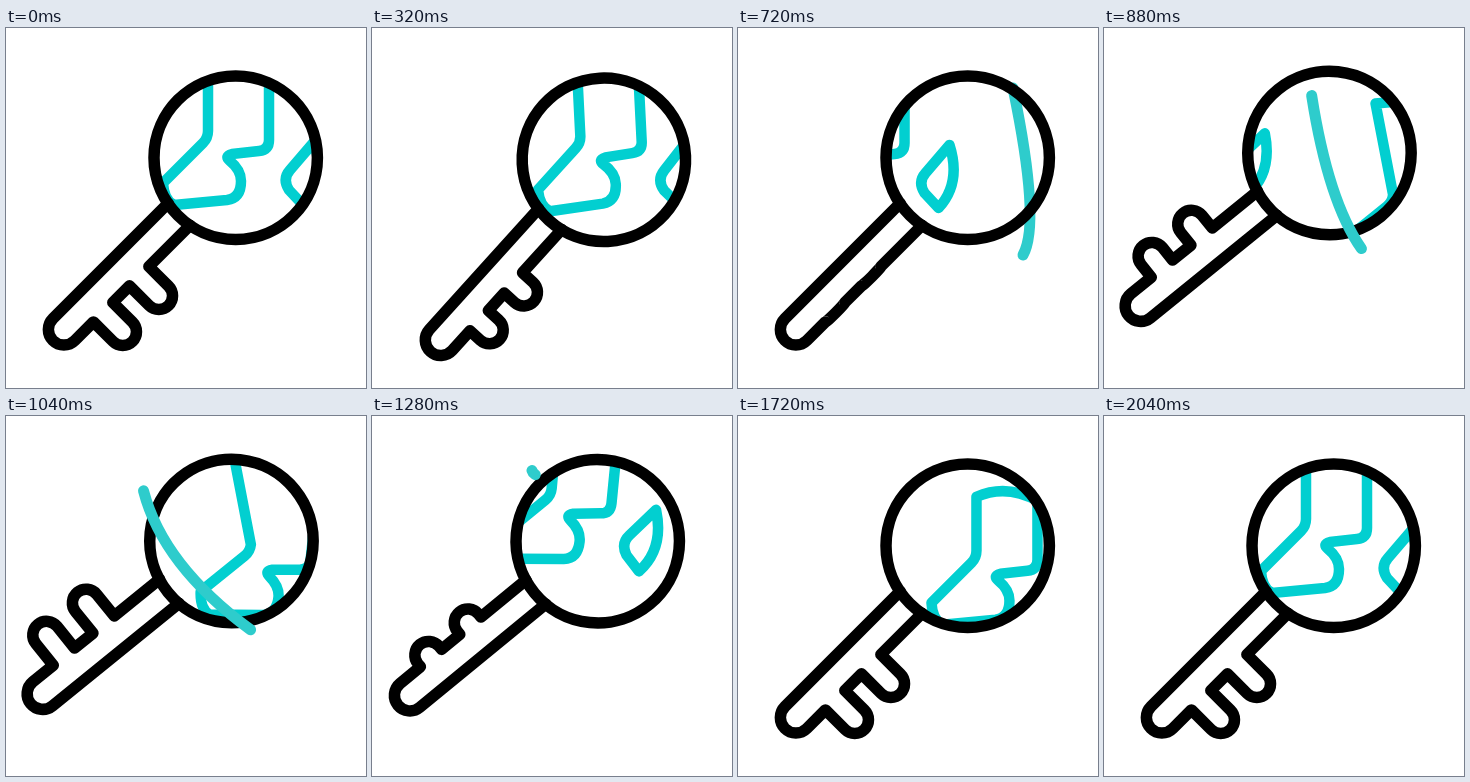
An HTML page with a canvas for the animation above (2.32 s loop, 360 by 360 pixels).

```html
<!DOCTYPE html>
<html>
<head>
<meta charset="utf-8">
<style>
html, body { margin: 0; overflow: hidden; background: #fff; }
canvas { display: block; }
</style>
</head>
<body>
<canvas id="stage" width="360" height="360"></canvas>
<script>
const ctx = document.getElementById('stage').getContext('2d');
const LOOP = 2320, STEP = 40;
const TEAL = '#02cfd0', COAST = '#2ecccc', BLACK = '#000';
const CENTER = [229.7, 129.7], PIVOT = [273, 87];
const SPIN_START = 400, SPIN_END = 2040, SPIN_WAY = 412;

const clamp = v => Math.max(0, Math.min(1, v));

// Smooth 0 to 1 between two times.
function ease(t, from, to) {
  const u = clamp((t - from) / (to - from));
  return u * u * (3 - 2 * u);
}

const mix = (a, b, u) => a.map((v, i) => v + (b[i] - v) * u);

// Wind up, swing over, swing back.
const windUp = t => ease(t, 40, 620);
const tilt = t => 6 * (2 * ease(t, 580, 860) - windUp(t) - ease(t, 1200, 1720));
const teeth = t => 1 - .7 * windUp(t) - 1.3 * ease(t, 600, 1000) + 2 * ease(t, 1060, 1680);

// Distance the globe has turned: a small pull back, a steady run, a soft stop.
function spin(t) {
  const u = clamp((t - SPIN_START) / (SPIN_END - SPIN_START));
  const pull = 6 * (ease(t, 0, 400) - ease(t, 400, 700));
  return SPIN_WAY * (1.2 * u - .2 * u ** 6) - pull;
}

// The land crosses the globe three times, each along its own slope.
const passes = [
  { at: 0, slope: 0, lift: 3, stretch: 0 },
  { at: 240, slope: .7, lift: -5, stretch: 1 },
  { at: SPIN_WAY, slope: .87, lift: 0, stretch: 0 }
];

function stroke(color, width, path) {
  ctx.strokeStyle = color;
  ctx.lineWidth = width;
  path ? ctx.stroke(path) : ctx.stroke();
}

function drawLand(k) {
  const up = 35 * k;
  const mainland = `M${202 - 27 * k} ${49 - up} Q232 ${36 - up} 263 ${53 - up}
    V112 Q263 122 253 123 L226 126 Q218 128 224 133 Q235 142 235 153
    Q235 170 221 172 L168 177 Q158 172 157 155 L197 115 Q202 110 202 103 Z`;
  const island = 'M308 114 L284 142 Q276 151 283 162 L297 177 Q320 152 308 114 Z';
  stroke(TEAL, 10.5, new Path2D(mainland + island));
}

function drawGlobe(t) {
  ctx.save();
  ctx.beginPath();
  ctx.arc(...CENTER, 79, 0, 7);
  ctx.clip();
  for (const { at, slope, lift, stretch } of passes) {
    const x = at - spin(t);
    ctx.save();
    ctx.translate(x, slope * x + lift * windUp(t));
    drawLand(stretch * (1 - ease(t, 1040, 1300)));
    ctx.restore();
  }
  ctx.restore();
}

// A far coast sweeps over the rim, then shrinks to a speck.
function drawCoast(t) {
  const sweep = ease(t, 720, 1040), shrink = .97 * ease(t, 1040, 1240);
  const place = (a, b) => mix(mix(a, b, sweep), [158, 65], shrink);
  ctx.beginPath();
  ctx.moveTo(...place([275, 60], [137, 89]));
  ctx.quadraticCurveTo(...place([303, 195], [164, 161]), ...place([285, 227], [258, 216]));
  stroke(COAST, 11);
}

function drawKey(s) {
  const half = 15.5, r = 13.7, depth = 41.5 * Math.abs(s), cap = Math.min(r, depth);
  ctx.save();
  ctx.translate(...CENTER);
  ctx.rotate(Math.PI * .75);
  ctx.scale(1, s < 0 ? 1 : -1);
  ctx.beginPath();
  ctx.moveTo(80, -half);
  ctx.arc(243, 0, half, -Math.PI / 2, Math.PI / 2);
  for (const x of [203, 152]) {
    ctx.lineTo(x + r, half);
    ctx.ellipse(x, half + depth - cap, r, cap, 0, 0, Math.PI);
    ctx.lineTo(x - r, half);
  }
  ctx.lineTo(80, half);
  stroke(BLACK, 11.5);
  ctx.beginPath();
  ctx.arc(0, 0, 81.7, 0, 7);
  stroke(BLACK, 11.5);
  ctx.restore();
}

function draw(t) {
  ctx.fillStyle = '#fff';
  ctx.fillRect(0, 0, 360, 360);
  ctx.lineCap = ctx.lineJoin = 'round';
  ctx.save();
  ctx.translate(...PIVOT);
  ctx.rotate(tilt(t) * Math.PI / 180);
  ctx.translate(-PIVOT[0], -PIVOT[1]);
  drawGlobe(t);
  if (t >= 680 && t < 880) drawCoast(t);
  drawKey(teeth(t));
  if (t >= 880 && t < 1520) drawCoast(t);
  ctx.restore();
}

const start = performance.now();
function tick() {
  const t = (performance.now() - start) % LOOP;
  draw(Math.floor(t / STEP) * STEP);
  requestAnimationFrame(tick);
}
tick();
</script>
</body>
</html>
```
